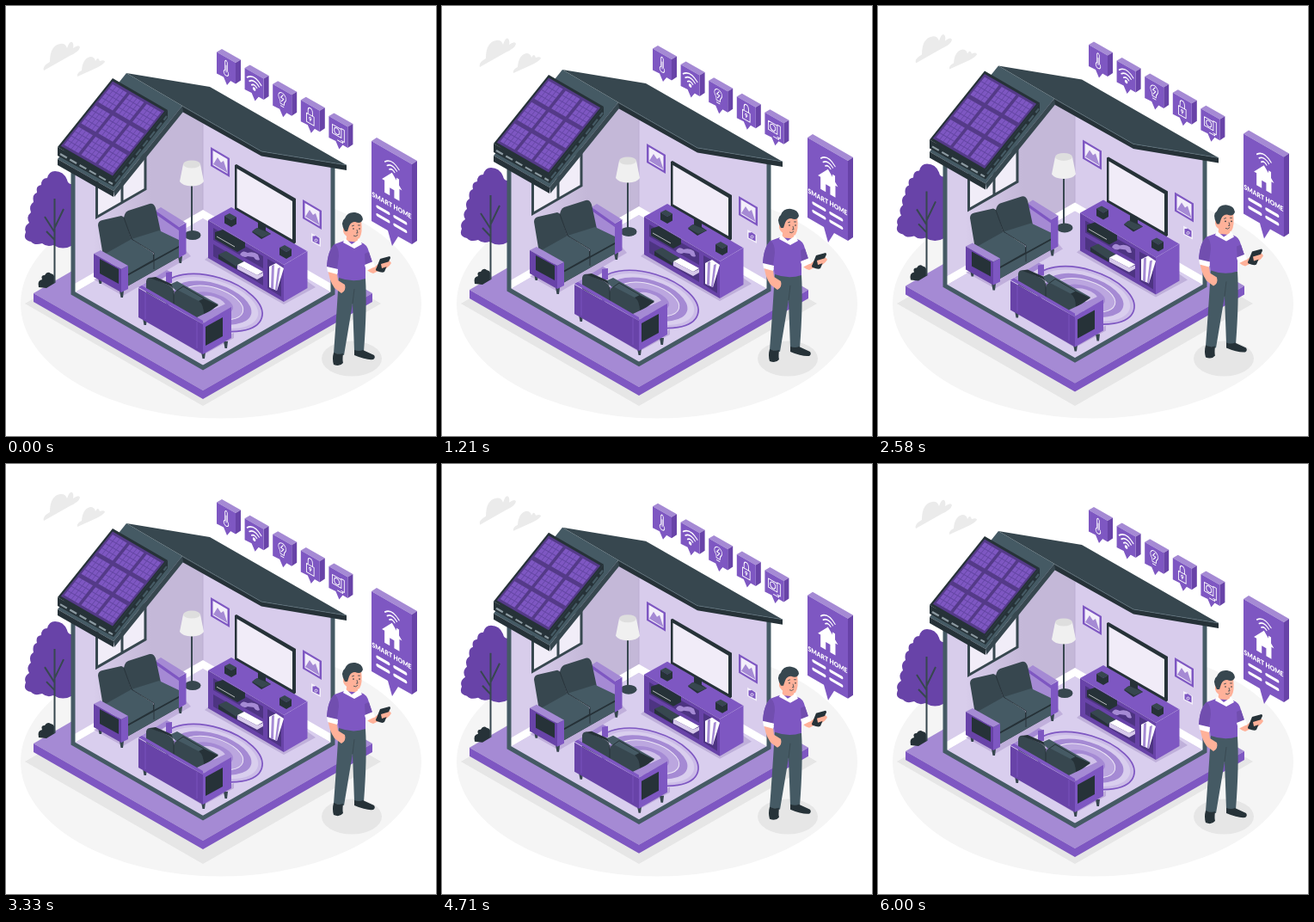
These frames come from a looping animation (500 px wide and 500 px high, 6.04 s). An HTML page:

```html
<!DOCTYPE html>
<html lang="en">
<head>
<meta charset="utf-8">
<title>Smart home</title>
<style>
  html, body { margin: 0; width: 100%; height: 100%; overflow: hidden; background: #fff; }
  svg { display: block; width: 100vw; height: 100vh; }
  .main { fill: #7e57c2; } .light { fill: #a58ad4; } .deep { fill: #6843a8; } .shade { fill: #4d3482; }
  .slate { fill: #455a64; } .dark { fill: #37474f; } .black { fill: #263238; }
  .white { fill: #fff; } .skin { fill: #ffb199; }
  .line { fill: none; stroke: #fff; stroke-width: 1; stroke-linecap: round; stroke-linejoin: round; }
  .bar { stroke-width: 3.6; }
  text { font: 900 7.8px Lato, "Open Sans", sans-serif; fill: #fff; }
</style>
</head>
<body>
<svg viewBox="0 0 500 500">
  <defs>
    <linearGradient id="wall"><stop offset=".15" stop-color="#d8cdeb"/><stop offset=".6" stop-color="#c4b8d8"/></linearGradient>
    <g id="picture">
      <path class="main" d="M0 0L22 13V35L0 22Z"/>
      <path fill="#f3effa" d="M2.500 4L19.500 14V31L2.500 21Z"/>
      <path class="light" d="M3 20L8 12L12 18L15 16L19.500 30Z"/>
    </g>
    <g id="cube">
      <path class="dark" d="M0 3L6 0L14 4.500L8 8Z"/>
      <path class="black" d="M0 3L8 8V16L0 11.500ZM8 8L14 4.500V12.500L8 16Z"/>
    </g>
    <path id="leg" class="dark" d="M0 0H5L4 8H1.500Z"/>
    <path id="waves" class="line" style="stroke-width:1.500" d="M-3.500 -3Q0 -6.500 3.500 -3M-6.500 -6Q0 -12 6.500 -6M-9.500 -9Q0 -18 9.500 -9"/>
  </defs>

  <g id="ground">
    <ellipse cx="250" cy="346" rx="233" ry="133.500" fill="#f5f5f5"/>
    <path fill="#e6e6e6" d="M22 346L229 227L436 346L229 465Z"/>
    <ellipse cx="402" cy="410" rx="35" ry="20.500" fill="#e6e6e6"/>
  </g>

  <g id="floating">
    <g id="clouds" fill="#ebebeb">
      <path d="M44 75Q42 70 51 65Q51 46 63 44Q69 43 71 49Q74 40 77 42Q79 44 78 49Q85 44 86 48Q85 53 74 58Z"/>
      <path d="M83 82Q82 78 88 75Q89 61 98 59Q103 59 104 64Q107 58 109 64Q115 62 115 65Q112 69 103 73Z"/>
    </g>

    <g id="platform">
      <path class="light" d="M32 334L229 220L426 334L229 447Z"/>
      <path class="main" d="M32 334L229 447V457L32 344ZM229 447L426 334V344L229 457Z"/>
    </g>

    <g id="tree">
      <path class="black" d="M38 327Q36 319 42 318Q40 313 45 313Q48 308 52 311Q58 312 57 322L47 328Z"/>
      <path class="deep" d="M57 192Q50 192 48 200Q41 200 41 208Q34 209 36 217Q30 219 32 228Q26 232 29 240Q23 245 27 252Q20 257 23 263Q19 272 29 274Q33 279 42 276Q48 281 55 278Q66 285 78 278V207Q72 208 71 202Q67 192 57 192Z"/>
      <path d="M56.500 322V224M56.500 263L45 245M56.500 258L67 236M56.500 272L47 262" fill="none" stroke="#37474f" stroke-width="2"/>
    </g>

    <g id="room">
      <path fill="url(#wall)" d="M78 180L140 130L205 118L229 132V247L78 334Z"/>
      <path fill="#d8ccec" d="M229 132L297 170L380 186V334L229 247Z"/>
      <path fill="#d9ceee" d="M78 334L229 247L380 334L229 421Z"/>
      <path class="white" d="M78 324L229 237L380 324V334L229 247L78 334Z"/>
      <path d="M229 132V237" stroke="#bcaed3"/>
      <path fill="#f1edf8" stroke="#37474f" stroke-width="3" d="M105.500 205L162 172V213L105.500 245.500ZM135 188V228"/>
    </g>

    <g id="lamp">
      <ellipse class="dark" cx="217" cy="266.500" rx="9.500" ry="5.500"/>
      <path d="M216 205V266" stroke="#37474f" stroke-width="2"/>
      <path fill="#f0f0f0" d="M206 184L202 204Q205 209 216 209.500Q227 209 230 204L226 184Z"/>
      <ellipse cx="216" cy="184" rx="10" ry="4.500" fill="#dedede"/>
    </g>

    <g id="media">
      <use href="#picture" x="238" y="164"/>
      <use href="#picture" x="345" y="225"/>
      <path fill="#f3effa" d="M355 264L366 270V280L355 274Z"/>
      <path class="main" d="M356.500 267.500H359L360 267L364.500 270V277.500L356.500 273.500Z"/>
      <circle cx="360.500" cy="272.500" r="1.500" fill="none" stroke="#fff" stroke-width=".8"/>
      <path class="black" d="M266 185L268 184L337 224V275L335 277L266 237Z"/>
      <path fill="#f1ecf8" d="M268.500 189L333 227V271.500L268.500 234.500Z"/>
      <path fill="#bfb0da" d="M231 295L323 347L360 327L350 320L323 338L238 289Z"/>
      <path class="main" d="M235 249L262 234L350 285L323 301Z"/>
      <path class="deep" d="M235 249L323 301V344L235 293Z"/>
      <path class="main" d="M323 301L350.500 285V328L323 344Z"/>
      <path class="shade" d="M241 258L299 291V305L241 272ZM241 277L299 310V325L241 291ZM304 294L320 303V338L304 328Z"/>
      <path class="black" d="M243 263L252 260L278 275V281L269 286L243 271Z"/>
      <path d="M245 268L266 280" stroke="#ddd" stroke-width=".8"/>
      <path class="light" d="M272 289Q275 283 281 287Q288 285 293 289L295 295Q291 297 288 292L281 291Q277 294 272 289Z"/>
      <path class="dark" d="M247 289L256 285L276 297L268 303Z"/>
      <path class="black" d="M247 289L268 303V306L247 294Z"/>
      <path class="white" d="M269 301L277 297L299 309L292 313Z"/>
      <path fill="#d6c9ea" d="M269 301L292 313L299 310V314L292 318L269 306Z"/>
      <path class="white" d="M306 303L314 299L323 305L315 331L306 327Z"/>
      <path class="light" d="M309 302L312 301L311 329L308 328ZM316 305L319 304L315 331L313 330Z"/>
      <use href="#cube" x="254" y="241"/>
      <use href="#cube" x="318" y="278"/>
      <path class="black" d="M286 263L290 259L293 258V250L302 254V261L308 265L297 271Z"/>
      <path class="dark" d="M286 262L292 258L308 265L298 269Z"/>
    </g>

    <g id="rug" transform="translate(240 345) rotate(17)">
      <ellipse rx="60" ry="30" fill="#cbbbe7" stroke="#7e57c2" stroke-width="1.700"/>
      <ellipse rx="55" ry="26.500" fill="#d9ceee"/>
      <ellipse rx="47" ry="22.500" fill="#a58ad4"/>
      <ellipse rx="37" ry="17.500" fill="#bba6df" stroke="#eee8f7"/>
      <ellipse rx="25" ry="11" fill="#a58ad4"/>
      <ellipse rx="16" ry="7" fill="#d1c2ea"/>
    </g>

    <g id="backSofa">
      <path fill="#c0afdb" d="M102 318L136 337L215 291L209 284Z"/>
      <use href="#leg" x="107" y="315"/><use href="#leg" x="132" y="331"/><use href="#leg" x="200" y="291"/>
      <path class="light" d="M174 238L180 234L209 252L201 257V278L176 262Z"/>
      <path class="main" d="M201 257L209.500 252V288L201 293ZM174 238L201 257V261L174 242Z"/>
      <path class="dark" d="M107 255Q107 250 112 249L134 244Q138 245 139 250L146 273L113 291Z"/>
      <path class="dark" d="M137 246Q138 240 142 238L167 230Q172 229 174 235L180 263L146 273Z"/>
      <path class="black" d="M141 306L201 272V292L141 326Z"/>
      <path class="slate" d="M112 290L146 271L171 287V295L141 312Z"/>
      <path class="slate" d="M146 271L178 261L201 272V279L172 295V287Z"/>
      <path class="slate" d="M141 314L201 281V292L141 326Z"/>
      <path d="M137 246L146 271L172 287V306M141 313L201 280" fill="none" stroke="#263238" stroke-width=".9"/>
      <path class="light" d="M102 288L110 284L142 302L134 306Z"/>
      <path class="deep" d="M102 288L134 306V333L102 315Z"/>
      <path class="main" d="M134 306L142 302V329L134 333Z"/>
      <path class="black" d="M109 294L131 306V323L109 311Z"/>
    </g>

    <g id="frontSofa">
      <path fill="#bdabd9" d="M157 362L229 406L265 386V380L229 398Z"/>
      <use href="#leg" x="159" y="363"/><use href="#leg" x="227" y="402"/><use href="#leg" x="253" y="390"/>
      <path class="light" d="M154 327L187 307L193 310L161 330Z"/>
      <path class="main" d="M186 310L193 309V322H186Z"/>
      <path class="slate" d="M190 324L199 320L247 347L231 360Z"/>
      <path class="dark" d="M163 333V320Q164 315 169 316L190 325Q195 328 195 333V350Z"/>
      <path class="dark" d="M195 350V336Q196 330 201 331L224 343Q230 347 230 351V369Z"/>
      <path class="black" d="M167 316L174 315L192 323L195 330Q193 326 190 325Z"/>
      <path class="black" d="M224 343L230 340L247 348L230 359Q230 347 224 343Z"/>
      <path d="M195 331V350M199 331L206 326L230 340" fill="none" stroke="#263238"/>
      <path class="light" d="M222 362L256 346L262 350L229 369Z"/>
      <path class="main" d="M154 327L158 325L229 366V370Z"/>
      <path class="deep" d="M154 328L229 370V405L154 362Z"/>
      <path class="main" d="M229 369L262 350V386L229 405Z"/>
      <path class="black" d="M232 373L252 362V384L232 395Z"/>
      <path d="M162 333V364M222 367V398" stroke="#7e57c2" stroke-width=".8"/>
    </g>

    <path id="frame" d="M78 190V334L229 420.500L380 334V187" fill="none" stroke="#455a64" stroke-width="5"/>

    <g id="roof">
      <path class="dark" d="M140 78L237 94L396 185L297 169L205 116Z"/>
      <path class="black" d="M205 116L297 169L396 185V191L297 174.500L205 123Z"/>
      <path d="M205 116.500L297 169L396 185" fill="none" stroke="#607580" stroke-width=".7"/>
      <path class="slate" d="M140 78L205 116L125 215L60 178Z"/>
      <path class="dark" d="M205 116L206 123L126 222L125 215Z"/>
      <path class="black" d="M60 178L125 215V222L60 185Z"/>
      <path class="black" d="M60 164L125 200L188 121V130L125 210L60 174Z"/>
      <path d="M63 172L124 207" stroke="#8c9aa1" stroke-width="2.200" stroke-dasharray="9 4"/>
      <path d="M127 204L187 128" stroke="#455a64" stroke-width="2.200" stroke-dasharray="9 4"/>
      <g transform="matrix(.64 .37 -.64 .8 124 84)" id="panels">
        <path class="black" d="M0 0H100V100H0Z"/>
        <path fill="#543a88" d="M3 3H97V97H3Z"/>
      </g>
    </g>

    <g id="callouts"></g>

    <g id="sign">
      <path class="light" d="M425 157L431 153L478 180L472 184Z"/>
      <path class="deep" d="M472 184L478 180V273L472 277Z"/>
      <path class="main" d="M425 157L472 184V277L456 268L449 279L444 261L425 250Z"/>
      <g transform="matrix(.866 .5 0 1 425 157)">
        <use href="#waves" x="27.500" y="24"/>
        <path class="white" d="M27.500 23L14 37H17.500V51H24.500V42H30.500V51H37.500V37H41L37 33V26H33.500V29Z"/>
        <text x="27.200" y="64" text-anchor="middle">SMART HOME</text>
        <path class="line bar" d="M8 72.500H23M8 82H23M31 72.500H46M31 82H46"/>
      </g>
    </g>

    <g id="man">
      <path class="slate" d="M387 314L418 317Q420 350 416 402L405 401L403 346L393 406L381 404Q385 350 387 314Z"/>
      <path d="M403 346L405 329" stroke="#37474f" stroke-width=".8"/>
      <path class="black" d="M381 403Q387 406 392 404Q391 412 392 415Q388 420 381 417Q379 410 381 403ZM405 400Q411 402 415 400L428 406Q430 409 427 411Q419 412 405 406Z"/>
      <path class="skin" d="M374 303L384 305L386 319L394 324Q396 331 390 334L382 328Q375 318 374 303Z"/>
      <path class="skin" d="M418 298L428 304L438 296Q446 294 448 299Q444 306 435 307L427 311Q420 309 416 302Z"/>
      <path class="skin" d="M397 262H409V276L403 280L395 276Z"/>
      <path class="main" d="M393 273L413 275Q420 277 422 286L427 301L418 305L418 317Q403 322 387 316L385 306L373 304Q374 284 382 277Z"/>
      <path fill="#714eaf" d="M382 277Q387 280 387 291L385 306L373 304Q374 284 382 277ZM417 288L422 286L427 301L418 305Z"/>
      <path class="white" d="M394 270L402 277L411 271L414 277L405 282L392 275ZM373 303L386 306L385 312L374 309ZM417 301L427 297L429 303L419 308Z"/>
      <path class="black" d="M435 294L446 291Q448 292 446 295L440 309Q438 311 431 308Q429 307 431 304Z"/>
      <path class="skin" d="M436 300L446 297Q448 300 443 303L437 305Z"/>
      <path class="skin" d="M395 250Q404 244 413 249Q415 264 411 270Q405 274 398 269Q391 265 392 259Z"/>
      <path class="dark" d="M394 262Q388 251 394 247Q397 239 406 240Q414 241 415 248Q413 254 406 251Q401 251 399 256L397 262Z"/>
      <path d="M402 256L405 255M409 255L412 255M404 267Q407 269 409 266M408 260L409 264L407 264" fill="none" stroke="#37474f" stroke-width=".8"/>
      <circle class="black" cx="404" cy="259" r=".8"/><circle class="black" cx="411" cy="259" r=".8"/>
    </g>
  </g>
</svg>
<script>
  const byId = id => document.getElementById(id);
  const range = n => [...Array(n).keys()];

  const panel = (col, row) => {
    const size = 26, x = 6 + col * 31, y = 6 + row * 31;
    const lines = range(3).map(i => {
      const step = (i + 1) * size / 4;
      return `M${x + step} ${y}v${size}M${x} ${y + step}h${size}`;
    }).join("");
    return `<path class="main" d="M${x} ${y}h${size}v${size}h${-size}z"/>
      <path d="${lines}" stroke="#6446a3" stroke-width="1"/>`;
  };
  byId("panels").innerHTML += range(9).map(i => panel(i % 3, Math.floor(i / 3))).join("");

  // Line icons, centred on 0,0
  const icons = [
    '<path class="line" d="M-1.500 3V-7Q0 -10 1.500 -7V3A3.200 3.200 0 1 1 -1.500 3ZM0 5V-3"/>',
    '<use href="#waves" y="6"/><circle class="white" cy="6" r="2"/>',
    '<path class="line" d="M-2.500 5Q-2 2 -4 0A5 5 0 1 1 4 0Q2 2 2.500 5ZM-2 7.500H2M1 -6L-2 -2H2L-1 2"/>',
    '<path class="line" d="M-5 -1H5V9H-5ZM-3 -1V-5Q-3 -9 0 -9Q3 -9 3 -5V-1M0 4V6"/><circle class="line" cy="3" r="1.300"/>',
    '<path class="line" d="M-8 -5H4V5H-8ZM4 -6H8V8H4M6 8V10H-1"/><circle class="line" cx="-2" r="3.500"/>'
  ];
  byId("callouts").innerHTML = icons.map((icon, i) => `
    <g transform="translate(${245 + i * 32.6} ${53.500 + i * 18.6})">
      <path class="light" d="M0 0L6 -3.500L28 9L22 12.500Z"/>
      <path class="deep" d="M22 12.500L28 9V33L22 37ZM15 33L18 31L12 38Z"/>
      <path class="main" d="M0 0L22 12.500V37L16 33.500L12 38.500L8 29L0 25Z"/>
      <g transform="matrix(.866 .5 0 1 11 18.500)">${icon}</g>
    </g>`).join("");

  const LOOP = 6040, CYCLE = 6000, RISE = 10;
  const floating = byId("floating");
  const start = performance.now();

  function draw(now) {
    const t = Math.min(Math.max(0, now - start) % LOOP, CYCLE);
    const lift = RISE * (1 - Math.abs(1 - 2 * t / CYCLE));
    floating.setAttribute("transform", `translate(0 ${-lift})`);
    requestAnimationFrame(draw);
  }
  draw(start);
</script>
</body>
</html>
```
